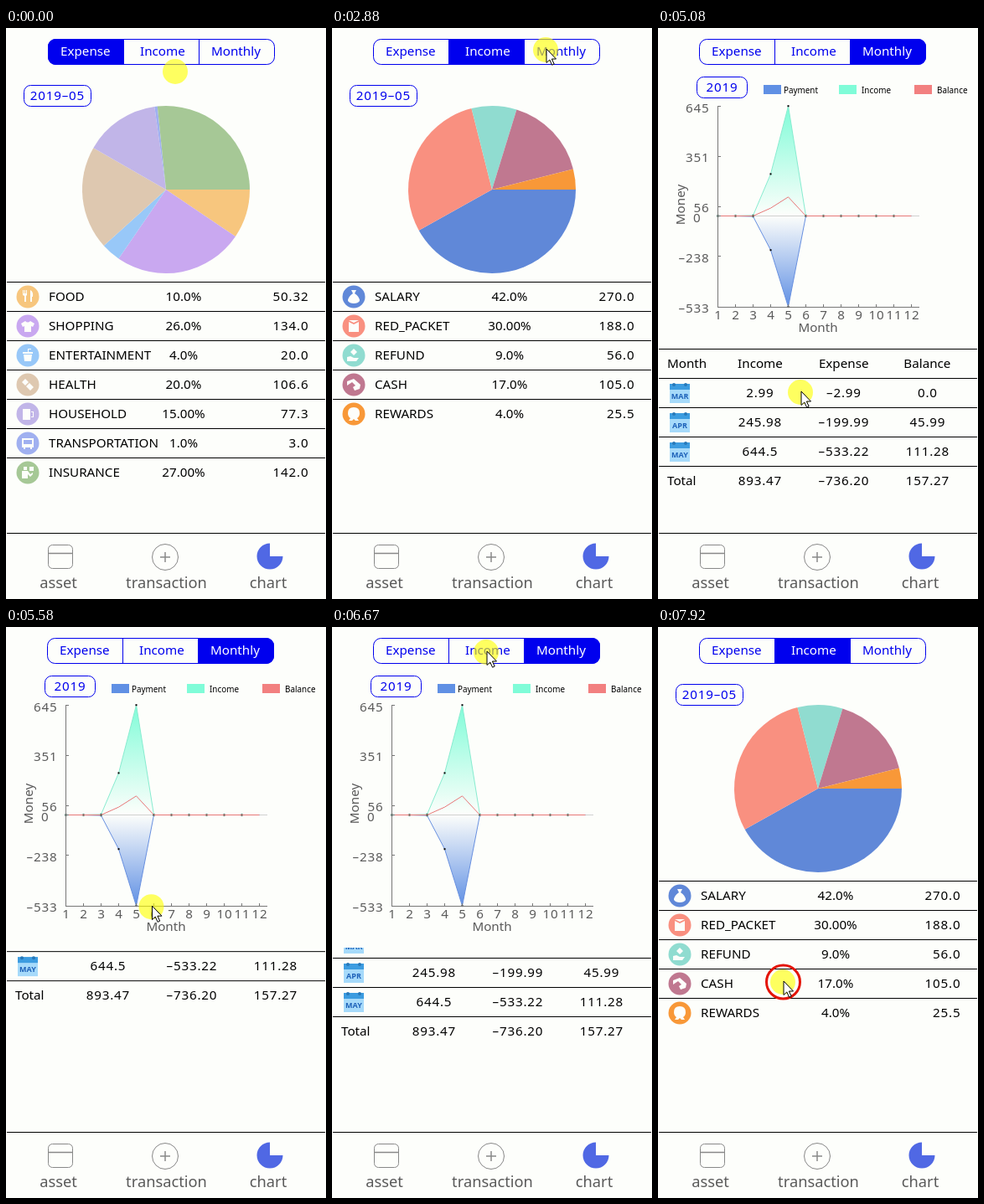
Write an HTML page with a canvas that moves like this. It is 382 px wide and 682 px high and loops after 8000 ms.

```html
<!DOCTYPE html>
<html lang="en">
<head>
<meta charset="utf-8">
<title>Expense charts</title>
<style>
html, body { margin: 0; width: 100%; height: 100%; overflow: hidden; background: #fdfefb; }
canvas { display: block; }
</style>
</head>
<body>
<canvas id="stage" width="382" height="682"></canvas>
<script>
const c = document.getElementById('stage').getContext('2d');
const LOOP = 8000, BG = '#fdfefb', BLUE = '#0000ee', GREY = '#5a5a5a', AXIS = '#777';
const SANS = '15.2px "Noto Sans", sans-serif';
const NAV = '18.3px "Noto Sans", sans-serif';
const LEGEND = '9.9px "Noto Sans", sans-serif';
const CAL = 'bold 9px "Noto Sans", sans-serif';

// name, share, amount, colour, icon glyph around 0,0
const expense = [
  ['FOOD', '10.0%', '50.32', '#f7c67e', 'M-6-8h1v4h1v-4h1v4h1v-4h1v6l-1 1v7h-2v-7l-2-1zM3-8q4 2 3 8h-1v6H3z'],
  ['SHOPPING', '26.0%', '134.0', '#c9a8f0', 'M-3-6Q0-3 3-6L8-3 6 1 4 0V7H-4V0L-6 1-8-3z'],
  ['ENTERTAINMENT', '4.0%', '20.0', '#98c8f8', 'M-6-4H6V-2H-6zM-5-1H5L4 7H-4zM0-8h4v1H1v3H0z'],
  ['HEALTH', '20.0%', '106.6', '#dec8b0', 'M-7-3L-3-7 1-3-3 1zM-2 2L2-2 7 3 3 7z'],
  ['HOUSEHOLD', '15.00%', '77.3', '#c1b5e8', 'M-6-6H3V7H-6zM4-3H7V4H4V3H6V-2H4z'],
  ['TRANSPORTATION', '1.0%', '3.0', '#a0b0f0', 'M-7-6H7V5H5V7H3V5H-3V7H-5V5H-7zM-5-4V1H5V-4z'],
  ['INSURANCE', '27.00%', '142.0', '#a6c896', 'M-5-7h4v4h-4zM-7-2H0L3 2 6 0V2L3 5 0 2V7H-7zM2-7H7V-2H2z']
];
const income = [
  ['SALARY', '42.0%', '270.0', '#6088d8', 'M-3-8H3L1-4Q7 0 7 5 5 8 0 8T-7 5Q-7 0-1-4z'],
  ['RED_PACKET', '30.00%', '188.0', '#f99080', 'M-6-7H6L0-4zM-6-5L0-2 6-5V7H-6z'],
  ['REFUND', '9.0%', '56.0', '#90dcd0', 'M0-8L4-4 0 0-4-4zM-8 2L-4 1 0 3H6L3 7H-8z'],
  ['CASH', '17.0%', '105.0', '#c07890', 'M-8-4L0-7 8 0 7 5 1 7-1 3 2 1-2-3-8 1z'],
  ['REWARDS', '4.0%', '25.5', '#f89838', 'M0-8Q7-8 7-1 7 3 4 5L6 8H2L0 6-2 8H-6L-4 5Q-7 3-7-1-7-8 0-8z']
];
const months = [
  ['MAR', '2.99', '–2.99', '0.0'],
  ['APR', '245.98', '–199.99', '45.99'],
  ['MAY', '644.5', '–533.22', '111.28'],
  ['Total', '893.47', '–736.20', '157.27']
];

// time, x, y of the pointer tip
const pointer = [
  [0, 203, 51], [40, 203, 51], [830, 186, 38], [920, 186, 38], [1000, 170, 32], [1330, 170, 32],
  [1380, 246, 213], [1709, 246, 213], [1710, 180, 34], [1950, 184, 34], [2330, 150, 470],
  [2670, 150, 470], [2880, 256, 25], [3460, 276, 30], [4290, 278, 30], [4650, 100, 228],
  [5080, 171, 434], [5170, 171, 434], [5700, 175, 318], [5960, 177, 270], [6040, 177, 270],
  [6360, 180, 328], [6670, 185, 29], [6920, 184, 30], [7790, 182, 30], [7920, 150, 423]
];
const scroll = [[5170, 0], [5700, 116], [6040, 116], [6360, 58]];
const clicks = [[1760, 1900], [3540, 3680], [6920, 7060], [7915, 8000]];

function valueAt(keys, t) {
  const i = keys.findIndex(k => k[0] > t);
  if (i < 0) return keys[keys.length - 1].slice(1);
  if (i === 0) return keys[0].slice(1);
  const a = keys[i - 1], b = keys[i];
  const u = (t - a[0]) / (b[0] - a[0]), e = u * u * (3 - 2 * u);
  return a.slice(1).map((v, n) => v + (b[n + 1] - v) * e);
}

function text(s, x, y, font = SANS, color = '#000', align = 'left') {
  c.font = font;
  c.fillStyle = color;
  c.textAlign = align;
  c.fillText(s, x, y);
}

// Figures are set a little wider than words.
function figures(s, x, y, color = '#000', align = 'center') {
  c.letterSpacing = '0.8px';
  text(s, x + .4, y, SANS, color, align);
  c.letterSpacing = '0px';
}

function rect(x, y, w, h, color) {
  c.fillStyle = color;
  c.fillRect(x, y, w, h);
}

const rule = y => rect(1, y, 380, 1, '#000');

function line(points, color, width = 1) {
  c.beginPath();
  points.forEach(p => c.lineTo(p[0], p[1]));
  c.strokeStyle = color;
  c.lineWidth = width;
  c.stroke();
}

function disc(x, y, r, color) {
  c.beginPath();
  c.arc(x, y, r, 0, 7);
  c.fillStyle = color;
  c.fill();
}

function box(x, y, w, h, r, color) {
  c.beginPath();
  c.roundRect(x + .5, y + .5, w, h, r);
  c.strokeStyle = color;
  c.lineWidth = 1;
  c.stroke();
}

function tabs(active) {
  const x = active ? 49 : 50;
  c.save();
  c.beginPath();
  c.roundRect(x, 13, 271, 31, 9);
  c.clip();
  rect(x + active * 90, 13, 91, 31, BLUE);
  c.restore();
  box(x, 13, 270, 30, 9, BLUE);
  rect(x + 90, 13, 1, 31, BLUE);
  rect(x + 180, 13, 1, 31, BLUE);
  ['Expense', 'Income', 'Monthly'].forEach((s, i) =>
    text(s, x + [15, 110, 195][i], 33, SANS, i === active ? '#fff' : BLUE));
}

function pie(rows) {
  const total = rows.reduce((sum, r) => sum + +r[2], 0);
  let a = 0;
  for (const r of rows) {
    const b = a + r[2] / total * Math.PI * 2;
    c.beginPath();
    c.moveTo(191, 193);
    c.arc(191, 193, 100, a, b);
    c.fillStyle = r[3];
    c.fill();
    a = b;
  }
}

function category(rows) {
  box(21, 68, 80, 25, 8, BLUE);
  figures('2019–05', 61, 86, BLUE);
  pie(rows);
  rows.forEach(([name, share, amount, color, glyph], i) => {
    const y = 303 + i * 35;
    rule(y);
    disc(26, y + 18, 13.5, color);
    c.save();
    c.translate(26, y + 18);
    c.fillStyle = BG;
    c.fill(new Path2D(glyph), 'evenodd');
    c.restore();
    text(name, 51, y + 23);
    text(share, 212, y + 23, SANS, '#000', 'center');
    figures(amount, 361, y + 23, '#000', 'right');
  });
}

const plotX = m => 50.5 + m * 21;
const plotY = v => 224.5 - v * .2037;

function series(values, color, fill) {
  const pts = Array.from({ length: 12 }, (_, i) => [plotX(i + 1), plotY(values[i] || 0)]);
  if (fill) {
    const g = c.createLinearGradient(0, plotY(values[4]), 0, 224);
    g.addColorStop(0, fill);
    g.addColorStop(1, fill + '00');
    c.beginPath();
    pts.forEach(p => c.lineTo(...p));
    c.fillStyle = g;
    c.fill();
  }
  line(pts, color);
  if (fill) pts.slice(0, 11).forEach(([x, y], i) =>
    rect(x - 1, y - 1, 2, 2, i === 3 || i === 4 ? '#000' : '#205040'));
}

function plot() {
  box(46, 58, 60, 25, 8, BLUE);
  figures('2019', 76, 76, BLUE);
  [['Payment', '#6090e4'], ['Income', '#80fcd8'], ['Balance', '#f28080']].forEach(([s, color], i) => {
    rect(126 + i * 90, 68, 21, 11, color);
    text(s, [150, 243, 333][i], 78, LEGEND);
  });
  rect(71, 224, 241, 1, '#d0d0d0');
  series([0, 0, 2.99, 245.98, 644.5], '#88ecd0', '#80fcd8');
  series([0, 0, -2.99, -199.99, -533.22], '#6890e0', '#6090e4');
  series([0, 0, 0, 45.99, 111.28], '#e87878');
  rect(71, 93, 1, 241, AXIS);
  rect(71, 333, 241, 1, AXIS);
  [[645, 101], [351, 160], [56, 220], [0, 232], [-238, 280], [-533, 340]].forEach(([v, y]) => {
    rect(71, Math.round(plotY(v) - .5), 4, 1, AXIS);
    figures(v < 0 ? '–' + -v : v, v ? 61 : 51, y, GREY, 'right');
  });
  for (let m = 1; m <= 12; m++) {
    rect(50 + m * 21, 330, 1, 4, AXIS);
    figures(m, plotX(m), 348, GREY);
  }
  text('Month', 191, 363, SANS, GREY, 'center');
  c.save();
  c.translate(32, 211);
  c.rotate(-Math.PI / 2);
  text('Money', 0, 0, SANS, GREY, 'center');
  c.restore();
}

function calendar(name, y) {
  rect(14, y - 11, 24, 23, '#a6dafa');
  rect(14, y - 11, 24, 7, '#3c9ce0');
  disc(19, y - 10, 2, '#2878b8');
  disc(33, y - 10, 2, '#2878b8');
  text(name, 26, y + 7, CAL, '#1c60b8', 'center');
}

function monthly(shift) {
  plot();
  c.save();
  c.beginPath();
  c.rect(0, 383, 382, 220);
  c.clip();
  c.translate(0, -shift);
  rule(383);
  text('Month', 11, 406);
  ['Income', 'Expense', 'Balance'].forEach((s, i) =>
    text(s, 122 + i * 99.7, 406, SANS, '#000', 'center'));
  months.forEach(([name, ...values], i) => {
    const y = 418 + i * 35;
    rule(y);
    if (i < 3) calendar(name, y + 18);
    else text(name, 11, y + 23);
    values.forEach((v, n) => figures(v, 121.5 + n * 100, y + 23));
  });
  c.restore();
}

function nav() {
  const ink = '#888';
  rule(603);
  box(50, 617, 29, 28, 5, ink);
  line([[50, 627.5], [80, 627.5]], ink, 1.5);
  box(174, 616, 31, 31, 15.5, ink);
  line([[184, 632], [196, 632]], ink, 1.5);
  line([[190, 626], [190, 638]], ink, 1.5);
  c.beginPath();
  c.moveTo(315, 631);
  c.arc(315, 631, 15.5, 0, Math.PI * 1.5);
  c.fillStyle = '#5068e4';
  c.fill();
  text('asset', 62.5, 669, NAV, GREY, 'center');
  text('transaction', 191.5, 669, NAV, GREY, 'center');
  text('chart', 313, 669, NAV, GREY, 'center');
}

function cursor(t) {
  const [x, y] = valueAt(pointer, t);
  disc(x - 1, y + 1, 15, 'rgba(255,255,0,.62)');
  if (clicks.some(([a, b]) => t >= a && t < b)) {
    c.beginPath();
    c.arc(x - .5, y + 1, 20, 0, 7);
    c.strokeStyle = '#e41408';
    c.lineWidth = 3;
    c.stroke();
  }
  if (t < 40) return;
  c.save();
  c.translate(x, y);
  const arrow = new Path2D('M0 0V16.5L3.8 13 6.6 19.2 9.2 18 6.4 12H11.5z');
  c.fillStyle = '#fff';
  c.fill(arrow);
  c.strokeStyle = '#000';
  c.lineWidth = 1;
  c.stroke(arrow);
  c.restore();
}

function draw(now) {
  const t = now % LOOP;
  const active = t < 1850 ? 0 : t < 3600 ? 1 : t < 7000 ? 2 : 1;
  rect(0, 0, 382, 682, BG);
  tabs(active);
  if (active === 2) monthly(valueAt(scroll, t)[0]);
  else category(active ? income : expense);
  nav();
  cursor(t);
}

let start;
function frame(now) {
  start ??= now;
  draw(now - start);
  requestAnimationFrame(frame);
}
requestAnimationFrame(frame);
</script>
</body>
</html>
```
